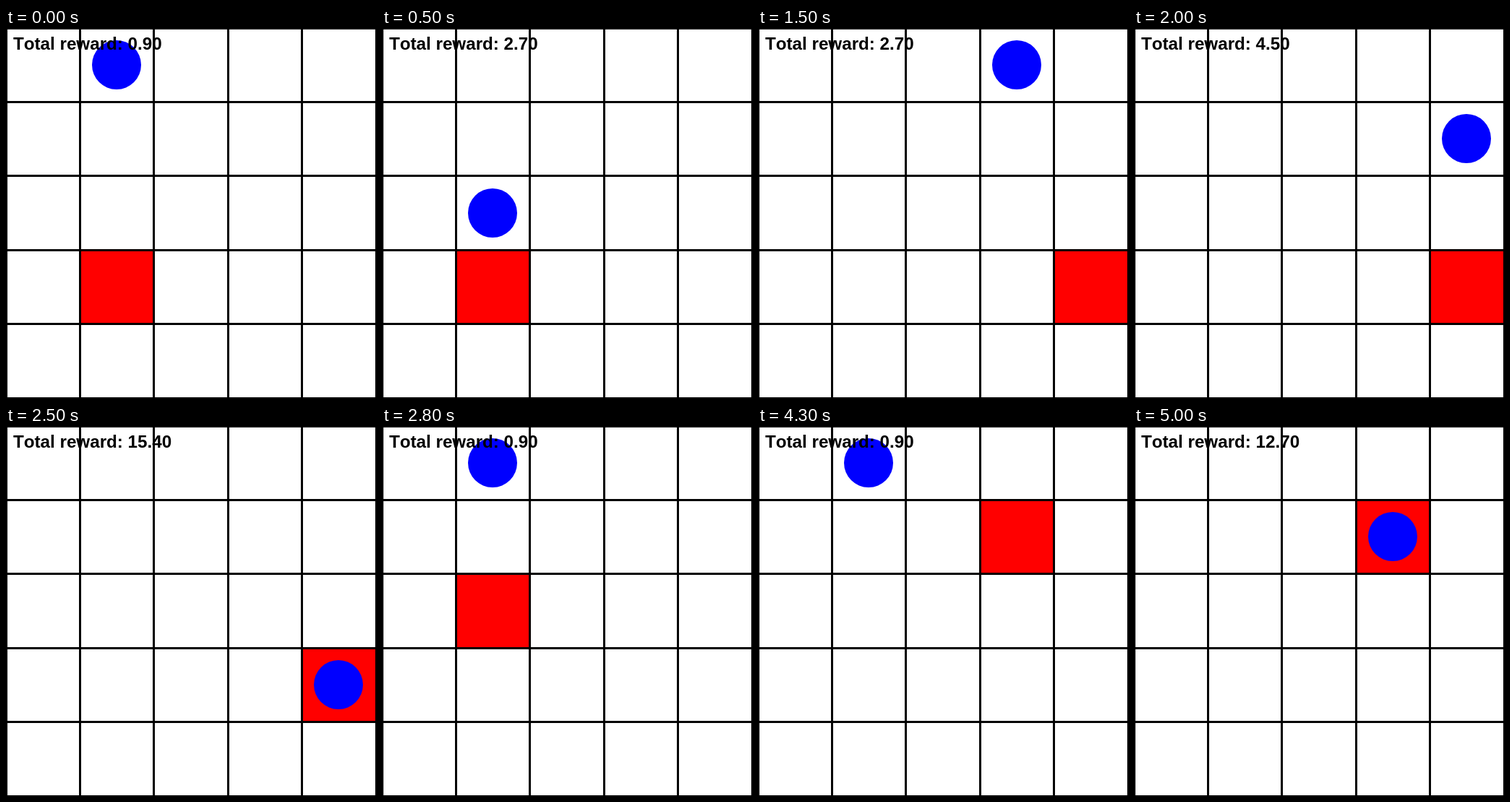
Recreate the animation shown at these times as an HTML page with a canvas. Size 512 by 512 pixels, loop 5.3 s.

```html
<!DOCTYPE html>
<html lang="en">
<head>
<meta charset="utf-8">
<title>Grid world</title>
<style>
  html, body { margin: 0; width: 100%; height: 100%; overflow: hidden; background: #fff; }
  canvas { display: block; }
</style>
</head>
<body>
<canvas id="stage" width="512" height="512"></canvas>
<script>
const ctx = document.getElementById("stage").getContext("2d");
const SIZE = 512, CELLS = 5, CELL = SIZE / CELLS;
const LOOP = 5300, STEP_REWARD = 0.9, GOAL_REWARD = 10;

// Every episode starts at column 1, row 0; the path lists right / down moves.
const episodes = [
  { goal: [1, 3], path: "DDD" },
  { goal: [4, 3], path: "RRRDDD" },
  { goal: [1, 2], path: "DD" },
  { goal: [2, 1], path: "RD" },
  { goal: [3, 1], path: "RRD" }
];

function buildSteps() {
  const steps = [];
  for (const { goal, path } of episodes) {
    let x = 1, y = 0, total = STEP_REWARD;
    steps.push({ x, y, goal, total });
    for (const move of path) {
      if (move === "R") x++; else y++;
      total += x === goal[0] && y === goal[1] ? GOAL_REWARD : STEP_REWARD;
      steps.push({ x, y, goal, total });
    }
  }
  return steps;
}

// Steps last a quarter second, rounded up to a tenth.
const steps = buildSteps().map((s, i) => ({ ...s, start: Math.ceil(i * 2.5) * 100 }));
const edge = i => Math.floor(i * CELL);
const center = i => Math.floor((i + 0.5) * CELL);

function draw({ x, y, goal, total }) {
  ctx.fillStyle = "#fff";
  ctx.fillRect(0, 0, SIZE, SIZE);

  const [gx, gy] = goal;
  ctx.fillStyle = "#f00";
  ctx.fillRect(edge(gx), edge(gy), edge(gx + 1) - edge(gx), edge(gy + 1) - edge(gy));

  ctx.fillStyle = "#00f";
  ctx.beginPath();
  ctx.arc(center(x), center(y), 34, 0, Math.PI * 2);
  ctx.fill();

  ctx.fillStyle = "#000";
  for (let i = 0; i <= CELLS; i++) {
    ctx.fillRect(edge(i) - 1, 0, 3, SIZE);
    ctx.fillRect(0, edge(i) - 1, SIZE, 3);
  }

  ctx.font = 'bold 24.2px "Liberation Sans", Arial, sans-serif';
  ctx.fontKerning = "none";
  ctx.fillText("Total reward: " + total.toFixed(2), 10, 30);
}

function frame() {
  const t = performance.now() % LOOP;
  draw(steps.findLast(s => s.start <= t));
  requestAnimationFrame(frame);
}
frame();
</script>
</body>
</html>
```
